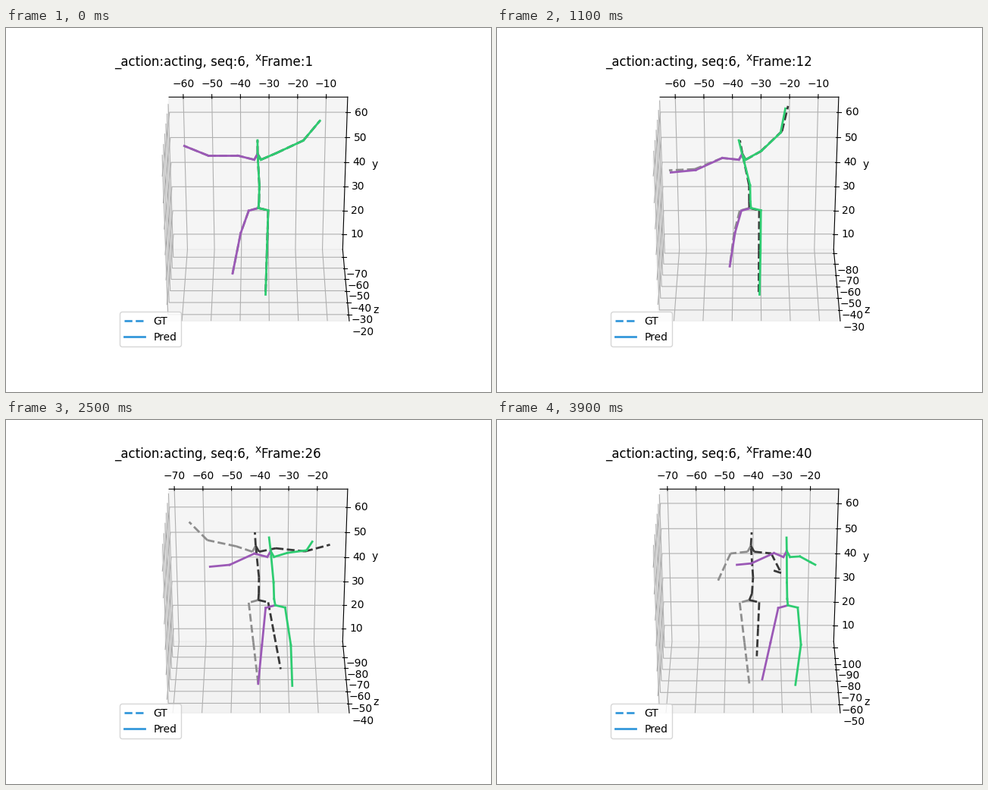
These frames come from a looping animation (640 by 480 pixels, 4000 ms). A matplotlib script:

```python
import numpy as np
import matplotlib.pyplot as plt
from matplotlib.animation import FuncAnimation
from matplotlib.lines import Line2D

W, H, DPI = 640, 480, 100
FRAMES, INTERVAL = 40, 100
R = 30                      # half range of each axis
SPLIT = 9                   # the prediction leaves the truth here
LAST = FRAMES - 1
KEYS = np.array([0, 7, 15, 19, 25, 33, 39])
PELVIS = np.array([333, 237.4])


def ease(t, start, end):
    u = np.clip((t - start) / (end - start), 0, 1)
    return u * u * (3 - 2 * u)


def bump(t, mid, width):
    return np.exp(-((t - mid) / width) ** 2)


def curve(*vals):
    """Cubic Hermite curve through values at the key times."""
    vals = np.array(vals)
    slopes = np.gradient(vals, KEYS)

    def at(t):
        i = min(np.searchsorted(KEYS, t, "right") - 1, len(KEYS) - 2)
        h = KEYS[i + 1] - KEYS[i]
        u = (t - KEYS[i]) / h
        return ((1 + 2 * u) * (1 - u) ** 2 * vals[i]
                + u * (1 - u) ** 2 * h * slopes[i]
                + u * u * (3 - 2 * u) * vals[i + 1]
                + u * u * (u - 1) * h * slopes[i + 1])
    return at


# Centre of the view in data units
root = [curve(-33.74, -33.0, -36.05, -38.65, -40.62, -41.35, -41.35),
        curve(34.65, 34.85, 34.45, 34.85, 35.75, 35.05, 34.3),
        curve(-46.0, -49.5, -55.5, -59.1, -63.3, -69.4, -74.3)]

# Sideways lean of the neck in pixels; arm angles in degrees below level
lean = curve(-1, -9, -7, -3.5, -3.5, -1.5, 2)
upper_l = curve(0, 24, 11, -7, -12, 15, 65)
fore_l = curve(-22, 5, -12, -38, -45, -56, 66)
upper_r = curve(-25, -42, -35, -12, 6, 15, 63)
fore_r = curve(-50, -78, -63, -38, -15, -67, -162)


def polar(side, length, angle):
    a = np.radians(angle)
    return np.array([side * length * np.cos(a), length * np.sin(a)])


def arm(neck, side, upper, fore, lengths, shrug=0):
    """Collar, shoulder, elbow and wrist; the shoulder follows the arm."""
    lift = -14 + 22 * np.sin(np.radians(upper)) + shrug
    bones = [polar(side, n, a) for n, a in zip(lengths, (lift, upper, fore))]
    collar = neck + [side * 4.4, 7.8]
    return np.cumsum([collar, *bones], axis=0)


def leg(hip, ankle, share, bend):
    return np.array([hip, hip + share * (ankle - hip) + [bend, 0], ankle])


def trunk(pelvis, tilt, bow):
    mid = 0.2 * tilt + bow
    return pelvis + np.array([[0, 0], [0.7 * mid, -8.5], [mid, -30],
                              [tilt, -71.5], [1.4 * tilt + 0.3, -89.3]])


def body(t, spine, ankles, arms, bend_r=0):
    """Chains of joints in pixels, y down, each with its side."""
    pelvis, neck = spine[0], spine[3]
    s = ease(t, 4, 26)
    left = leg(pelvis + [-12.7, 3.5], ankles[0], 0.36 + 0.13 * s, 3 * s - 3)
    right = leg(pelvis + [13, 3], ankles[1], 0.48, bend_r)
    arm_l = arm(neck, -1, *arms[0])
    arm_r = arm(neck, 1, *arms[1])
    return [(np.vstack([pelvis, left]), True),
            (np.vstack([pelvis, right]), False),
            (spine, False),
            (np.vstack([neck, arm_l]), True),
            (np.vstack([neck, arm_r]), False)]


def true_ankles(t):
    s = ease(t, 4, 26)
    return np.array([
        [299 + 34 * s, 324 + 24 * s - 16 * bump(t, 10, 5)],
        [342.5 + 22 * bump(t, 22.5, 8), 351.5 - 40 * ease(t, 14, 34)]])


def true_body(t):
    spine = trunk(PELVIS, lean(t), 1.5 + 3 * ease(t, 30, 39))
    lengths = 22.5, 39 - 10 * ease(t, 33, 39), 34 - 23 * ease(t, 26, 39)
    return body(t, spine, true_ankles(t),
                [(upper_l(t), fore_l(t), lengths),
                 (upper_r(t), fore_r(t), lengths)])


def predicted_body(t):
    if t <= SPLIT:
        return true_body(t)
    d = t - SPLIT
    u = d / (LAST - SPLIT)
    pelvis = PELVIS + [1.05 * d + 0.0215 * d * d, 7 * ease(d, 5, 17)]
    tilt = lean(SPLIT) - 6 * bump(d, 6, 4) + 8 * ease(d, 6, 28)
    spine = trunk(pelvis, tilt, 1.5 - 2.5 * ease(d, 0, 8))
    # The left foot stays planted, the right one steps aside
    planted = true_ankles(t)[0] + np.array([17, -6]) * ease(t, 31, 39)
    step = true_ankles(SPLIT)[1] + [50 * np.sin(np.pi / 2 * u) ** 1.3,
                                    -6 * bump(t, 33, 6)]
    # The left arm keeps its pose and only shortens
    arm_l = (upper_l(SPLIT), fore_l(SPLIT),
             (22.5 - 9 * u, 39 - 6 * u, 34 - 15 * u), -18 * u)
    arm_r = (upper_r(SPLIT) + 72 * ease(d, 2, 30),
             fore_r(SPLIT) + 107 * u ** 2.5,
             (25 - 12 * u, 36 - 20 * u, 33 - 26 * ease(d, 0, 24)))
    return body(t, spine, [planted, step], [arm_l, arm_r], 0.19 * d)


fig = plt.figure(figsize=(W / DPI, H / DPI), dpi=DPI)
ax = fig.add_subplot(projection="3d")
# The tiny turn keeps the left wall as the far one
ax.view_init(elev=120, azim=-90.0001)
ax.set_xlabel("x")
ax.set_ylabel("y")
ax.set_zlabel("z")
title = ax.set_title("", loc="left", y=1.0)
ax.legend(handles=[Line2D([], [], color="#3498db", lw=2, ls=ls, label=name)
                   for ls, name in (("--", "GT"), ("-", "Pred"))],
          loc="lower left")


def skeleton(left_color, right_color, style):
    return [fig.add_artist(Line2D([], [], lw=2, ls=style,
                                  color=left_color if left else right_color))
            for joints, left in true_body(0) for _ in joints[1:]]


gt_lines = skeleton("#8e8e8e", "#383838", "--")
pred_lines = skeleton("#9b59b6", "#2ecc71", "-")


def pose(lines, chains):
    bones = [pair for joints, _ in chains for pair in zip(joints, joints[1:])]
    for line, pair in zip(lines, bones):
        line.set_data(*(np.array(pair) / [W, -H] + [0, 1]).T)


def center_view(center):
    pad = R * 25 / 24       # walls reach a little past the ticks
    limits = ax.set_xlim, ax.set_ylim, ax.set_zlim
    ticks = ax.set_xticks, ax.set_yticks, ax.set_zticks
    for mid, set_lim, set_ticks in zip(center, limits, ticks):
        set_lim(mid - pad, mid + pad)
        first = np.ceil((mid - R) / 10) * 10
        set_ticks(np.arange(first, mid + R, 10))


def update(i):
    center_view([axis(i) for axis in root])
    pose(gt_lines, true_body(i))
    pose(pred_lines, predicted_body(i))
    title.set_text(f"_action:acting, seq:6,   Frame:{i + 1}")
    return [title, *gt_lines, *pred_lines]


anim = FuncAnimation(fig, update, frames=FRAMES, interval=INTERVAL,
                     repeat=True, repeat_delay=0, blit=False)
plt.show()
```
